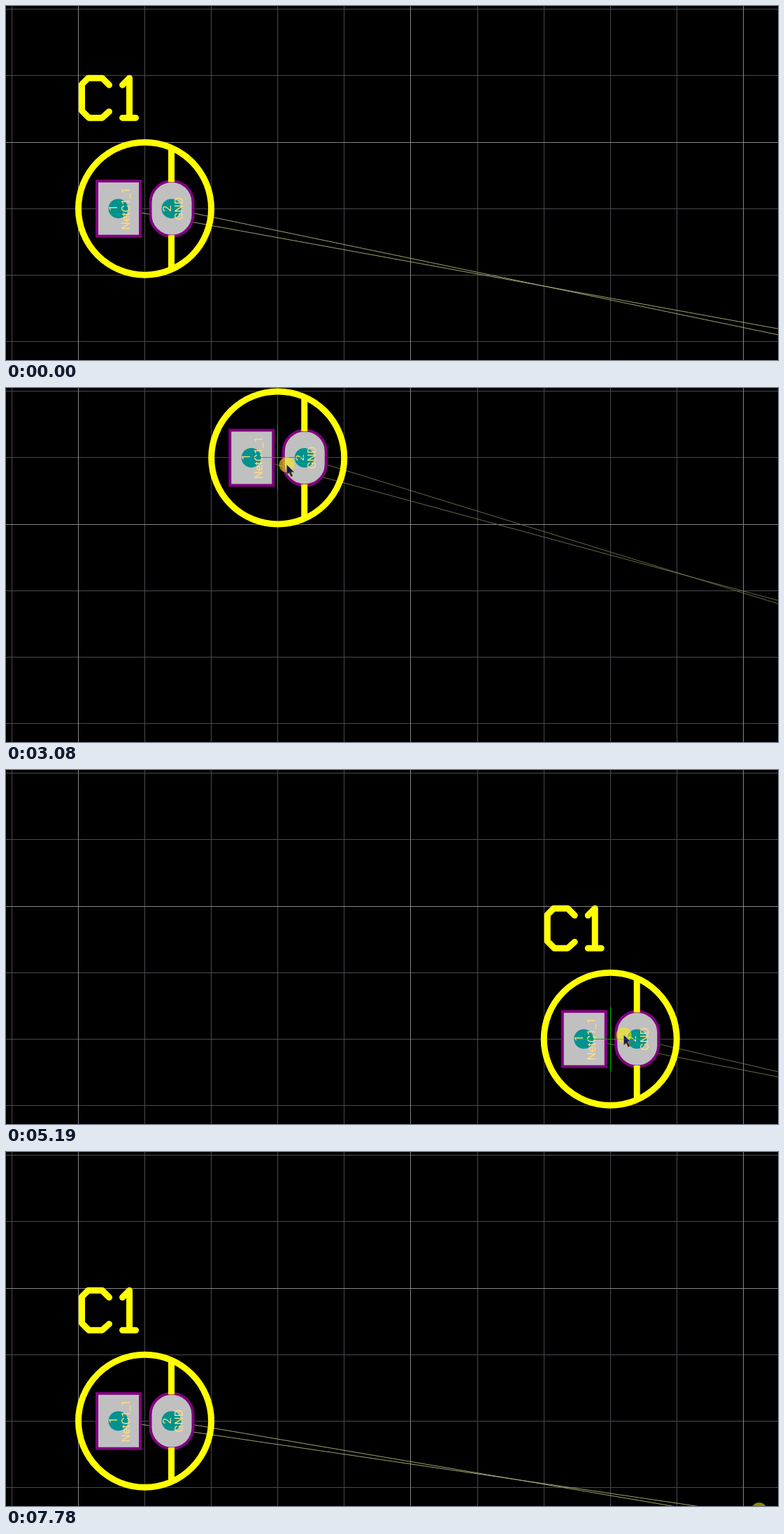
Recreate the animation shown at these times as an HTML page. Size 1104 px wide and 507 px high, loop 7850 ms.

```html
<!DOCTYPE html>
<html lang="en">
<head>
<meta charset="utf-8">
<title>Moving a footprint</title>
<style>
  html, body { margin: 0; width: 100%; height: 100%; overflow: hidden; background: #000; }
  svg { display: block; }
  .minor { stroke: #494951; }
  .major { stroke: #868686; }
  .silk { fill: none; stroke: #ff0; stroke-width: 9; }
  .label { stroke-linecap: round; stroke-linejoin: round; }
  .pad { fill: #c0c0c0; stroke: #800080; stroke-width: 4; }
  .hole { fill: #00928e; }
  text { font: 16px Roboto, "Liberation Sans", sans-serif; fill: #ffdc82; text-anchor: middle; }
  #nets { stroke: #b4b47c; stroke-width: .9; }
  #nets.held { stroke: #74744e; }
  #cross { stroke: #00c000; }
  #arrow { fill: #f3efc0; mix-blend-mode: difference; }
</style>
</head>
<body>
<svg width="1104" height="507" viewBox="0 0 1104 507">
  <g id="grid" shape-rendering="crispEdges"></g>
  <g id="nets"><line/><line/></g>
  <g id="part">
    <circle class="silk" r="95"/>
    <path class="silk label" d="M-51 -177L-61 -187H-81L-90 -178V-140L-80 -130H-61L-51 -139M-32 -177L-22 -187V-130M-32 -130H-13"/>
    <rect class="pad" x="-68.5" y="-39.5" width="62" height="79"/>
    <rect class="pad" x="8" y="-39.5" width="61" height="79" rx="30.5"/>
    <path class="silk" d="M38 -87V-38M38 38V87"/>
    <circle class="hole" cx="-38" r="14"/>
    <circle class="hole" cx="38" r="14"/>
    <text transform="translate(-39.5 -1) rotate(-90)">1</text>
    <text transform="translate(-21.5 0) rotate(-90)">NetC1_1</text>
    <text transform="translate(37 0) rotate(-90)">2</text>
    <text transform="translate(54.5 0) rotate(-90)">GND</text>
    <path id="cross" shape-rendering="crispEdges" d="M0 -46V46M-46 0H46"/>
  </g>
  <circle id="halo" r="11" fill="#fff000" fill-opacity=".56"/>
  <path id="arrow" d="M0 0V14.5L3.4 11.4L6 17L8.6 15.8L6.1 10.4H10.5Z"/>
</svg>
<script>
const LOOP = 7850, START = 110, STEP = 68.6;
const GRAB = 925, DROP = 6700, LAST_STEP = 7510, RETURN = 7775;
const PITCH = 95.1, LEFT = 8.32, TOP = 4.85;
const $ = id => document.getElementById(id);

// Far ends of the two net lines, with the pad offset each one starts from
const nets = [
  { from: -38, x: 2880, y: 786 },
  { from: 38, x: 2722, y: 808 }
];

// Pointer turning points: time, x, y
const keys = [
  [110, 946, 487], [650, 140, 298], [930, 187, 302], [1430, 189, 303],
  [2560, 94, 144], [3080, 414, 110], [4020, 951, 110], [4980, 945, 325],
  [5190, 882, 380], [5960, 306, 422], [6710, 198, 395], [7450, 1059, 520]
];

function set(el, attrs) {
  for (const key in attrs) el.setAttribute(key, attrs[key]);
}

function gridLine(major, attrs) {
  const line = document.createElementNS("http://www.w3.org/2000/svg", "line");
  set(line, { class: major ? "major" : "minor", ...attrs });
  $("grid").append(line);
}

for (let i = 0; i < 12; i++) {
  const x = Math.floor(LEFT + i * PITCH) + .5;
  gridLine(i % 5 === 1, { x1: x, x2: x, y1: 0, y2: 507 });
}
for (let j = 0; j < 6; j++) {
  const y = Math.floor(TOP + j * PITCH) + .5;
  gridLine(j === 2, { x1: 0, x2: 1104, y1: y, y2: y });
}
// Major lines stay on top at the crossings
document.querySelectorAll(".major").forEach(line => $("grid").append(line));

function speed(i, axis) {
  const [a, b] = [keys[i], keys[i + 1]];
  return (b[axis] - a[axis]) / (b[0] - a[0]);
}

// Monotone cubic tangent: rests wherever the direction reverses
function tangent(i, axis) {
  if (i === 0) return speed(0, axis);
  if (i === keys.length - 1) return speed(i - 1, axis);
  const before = speed(i - 1, axis), after = speed(i, axis);
  return before * after <= 0 ? 0 : 2 * before * after / (before + after);
}

function pointerAt(t) {
  if (t < START) return [-50, -50];
  if (t >= RETURN) return [1077, 513];
  const i = keys.findLastIndex(k => k[0] <= t);
  if (i === keys.length - 1) return keys[i].slice(1);
  const a = keys[i], b = keys[i + 1];
  const span = b[0] - a[0], u = (t - a[0]) / span;
  const ease = u * u * (3 - 2 * u);
  return [1, 2].map(axis => a[axis] + (b[axis] - a[axis]) * ease
    + span * u * (1 - u) * ((1 - u) * tangent(i, axis) - u * tangent(i + 1, axis)));
}

const snap = (v, origin) => origin + Math.round((v - origin) / PITCH) * PITCH;
const cell = (col, row) => [LEFT + col * PITCH, TOP + row * PITCH];

function partAt(t, [px, py]) {
  if (t < GRAB) return cell(2, 3);
  if (t >= DROP) return cell(2, 4);
  return [snap(px, LEFT), snap(py, TOP)];
}

function quantize(t) {
  if (t < START || t > LAST_STEP) return t;
  return START + Math.floor((t - START) / STEP + .05) * STEP;
}

function draw(now) {
  const t = quantize(now % LOOP);
  const pointer = pointerAt(t);
  const [x, y] = partAt(t, pointer);
  const held = t >= GRAB && t < DROP;

  for (const id of ["halo", "arrow"]) set($(id), { transform: `translate(${pointer})` });
  set($("part"), { transform: `translate(${x} ${y})` });
  set($("nets"), { class: held ? "held" : "" });
  set($("cross"), { visibility: held ? "visible" : "hidden" });
  nets.forEach((net, i) => set($("nets").children[i], {
    x1: x + net.from, y1: y, x2: net.x, y2: net.y
  }));
}

const begin = performance.now();
function tick() {
  draw(performance.now() - begin);
  requestAnimationFrame(tick);
}
tick();
</script>
</body>
</html>
```
